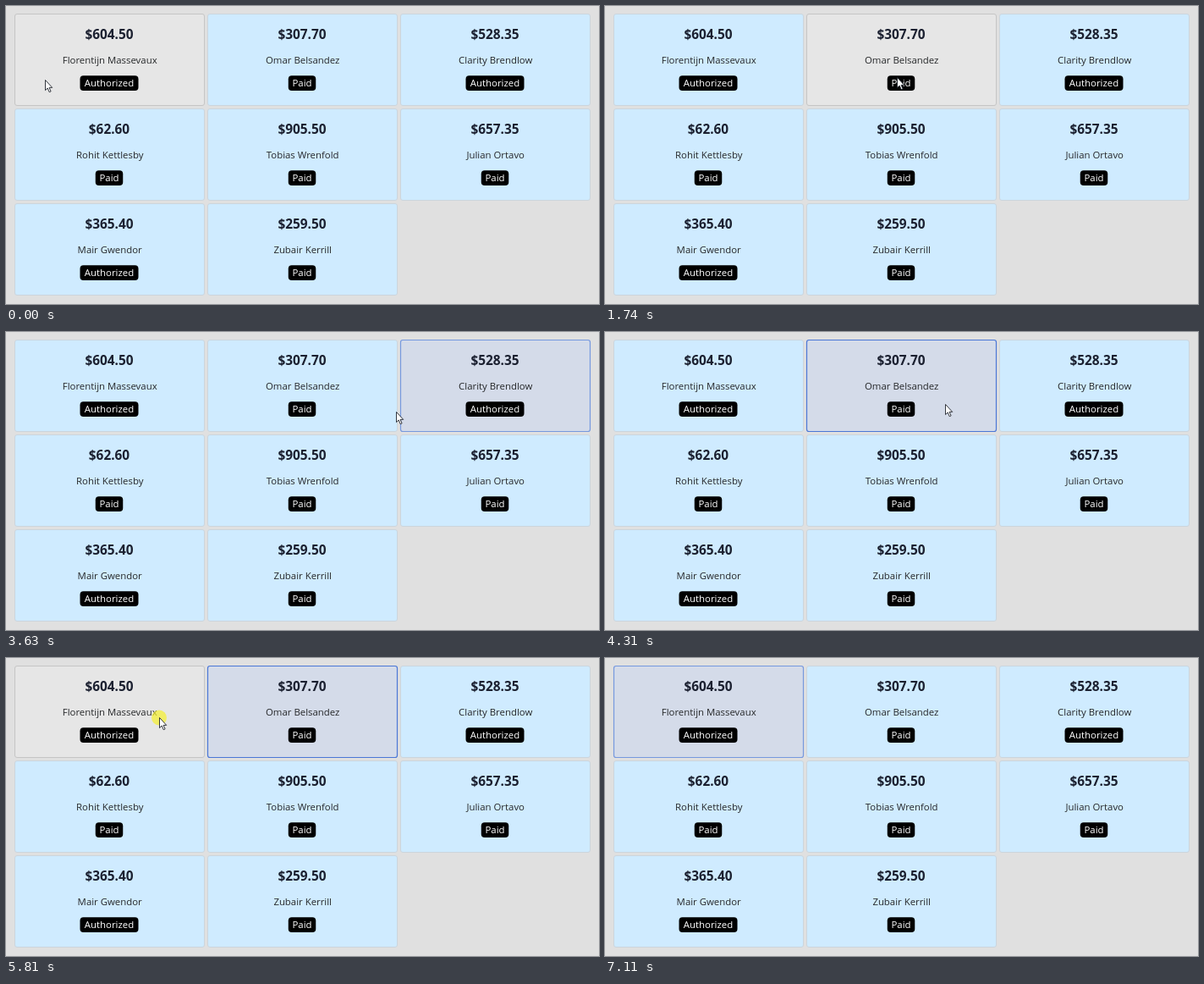
Recreate the animation shown at these times as an HTML page. Size 701 px wide and 352 px high, loop 8650 ms.

```html
<!DOCTYPE html>
<html lang="en">
<head>
<meta charset="utf-8">
<title>Payment cards</title>
<style>
html, body { margin: 0; width: 100%; height: 100%; overflow: hidden; background: #e0e0e0; }
svg { display: block; width: 701px; height: 352px; }
text { font-family: "Open Sans", "Noto Sans", sans-serif; font-size: 11.4px; text-anchor: middle; fill: #252729; }
.amount { font-size: 15.4px; font-weight: 700; fill: #1b2030; }
.status { fill: #fff; }
</style>
</head>
<body>
<svg id="stage" viewBox="0 0 701 352"></svg>
<script>
const LOOP = 8650;
const HOVER_LAG = 70;

const payments = [
  ["$604.50", "Florentijn Massevaux", "Authorized"],
  ["$307.70", "Omar Belsandez", "Paid"],
  ["$528.35", "Clarity Brendlow", "Authorized"],
  ["$62.60", "Rohit Kettlesby", "Paid"],
  ["$905.50", "Tobias Wrenfold", "Paid"],
  ["$657.35", "Julian Ortavo", "Paid"],
  ["$365.40", "Mair Gwendor", "Authorized"],
  ["$259.50", "Zubair Kerrill", "Paid"]
];

// Pointer strokes: start and last step (ms), step count, from, via (at progress u), to
const moves = [
  { start: 70, end: 620, steps: 9, from: [46, 87], u: 0.5, via: [96, 68], to: [147, 75] },
  { start: 890, end: 1740, steps: 13, from: [147, 75], u: 6 / 13, via: [232, 82], to: [345, 84] },
  { start: 2010, end: 2780, steps: 12, from: [345, 84], u: 8 / 12, via: [493, 92], to: [512, 94] },
  { start: 3430, end: 4060, steps: 10, from: [512, 94], u: 0.4, via: [461, 94], to: [402, 85] },
  { start: 4770, end: 5610, steps: 13, from: [402, 85], u: 0.5, via: [288, 81], to: [181, 70] },
  { start: 6410, end: 7110, steps: 11, from: [181, 70], u: 0.5, via: [92, 81], to: [-12, 86] }
];

// Highlight while pressing; the card is selected on release
const clicks = [
  { down: 2910, up: 3040, card: 2 },
  { down: 4180, up: 4310, card: 1 },
  { down: 5810, up: 5880, card: 0 }
];

const stage = document.getElementById("stage");

function add(tag, attrs, text) {
  const node = document.createElementNS("http://www.w3.org/2000/svg", tag);
  for (const key in attrs) node.setAttribute(key, attrs[key]);
  if (text) node.textContent = text;
  return stage.appendChild(node);
}

const cards = payments.map(([amount, name, status], i) => {
  const left = 228 * (i % 3), top = 112 * Math.floor(i / 3);
  const x = left + 10.5, y = top + 9.5, center = left + 122;
  const box = add("rect", { x, y, width: 224, height: 108, rx: 2.5 });
  const pillWidth = status === "Paid" ? 32.5 : 69;
  add("text", { x: center, y: top + 38.7, class: "amount" }, amount);
  add("text", { x: center + 0.7, y: top + 67.8 }, name);
  add("rect", { x: center - pillWidth / 2, y: top + 82.3, width: pillWidth, height: 17.6, rx: 4 });
  add("text", { x: center, y: top + 95.4, class: "status" }, status);
  return { box, x, y };
});

const glow = add("circle", { r: 9, fill: "#f5f02c", "fill-opacity": 0.7 });
const pointer = add("path", {
  d: "M.5 .5V12.6L3.2 10L5.2 14.7L7.1 13.9L5.1 9.4H8.7Z",
  fill: "#fff", stroke: "#20242c", "stroke-width": 0.9
});

function curve(a, b, c, u, p) {
  return a * (p - u) * (p - 1) / u
    + b * p * (p - 1) / (u * (u - 1))
    + c * p * (p - u) / (1 - u);
}

function pointerAt(t) {
  const move = moves.filter(m => t >= m.start).pop();
  if (!move) return moves[0].from;
  const { start, end, steps, from, u, via, to } = move;
  const step = Math.floor((t - start) / (end - start) * (steps - 1) + 0.25);
  const p = Math.min(1, (step + 1) / steps);
  return [0, 1].map(k => Math.round(curve(from[k], via[k], to[k], u, p)));
}

function cardStyle(index, selected, hovered) {
  if (index === selected) return ["#d4dbe9", index === 1 ? "#4a76d6" : "#7598de"];
  if (index === hovered) return ["#e6e6e6", "#c5c5c5"];
  return ["#cfebff", "#cbd5dd"];
}

function draw(t) {
  const [px, py] = pointerAt(t);
  const [hx, hy] = pointerAt(t - HOVER_LAG);
  const hovered = cards.findIndex(({ x, y }) => hx >= x && hx <= x + 224 && hy >= y && hy <= y + 108);
  const lastClick = clicks.filter(c => t >= c.up).pop();
  const selected = lastClick ? lastClick.card : -1;
  const pressed = clicks.some(c => t >= c.down && t < c.up);

  cards.forEach(({ box }, i) => {
    const [fill, stroke] = cardStyle(i, selected, hovered);
    box.setAttribute("fill", fill);
    box.setAttribute("stroke", stroke);
    box.setAttribute("stroke-width", i === selected ? 1.2 : 1);
  });
  pointer.setAttribute("transform", `translate(${px} ${py})`);
  glow.setAttribute("cx", px);
  glow.setAttribute("cy", py + 0.5);
  glow.setAttribute("visibility", pressed ? "visible" : "hidden");
}

const begin = performance.now();
function tick() {
  draw((performance.now() - begin) % LOOP);
  requestAnimationFrame(tick);
}
tick();
</script>
</body>
</html>
```
